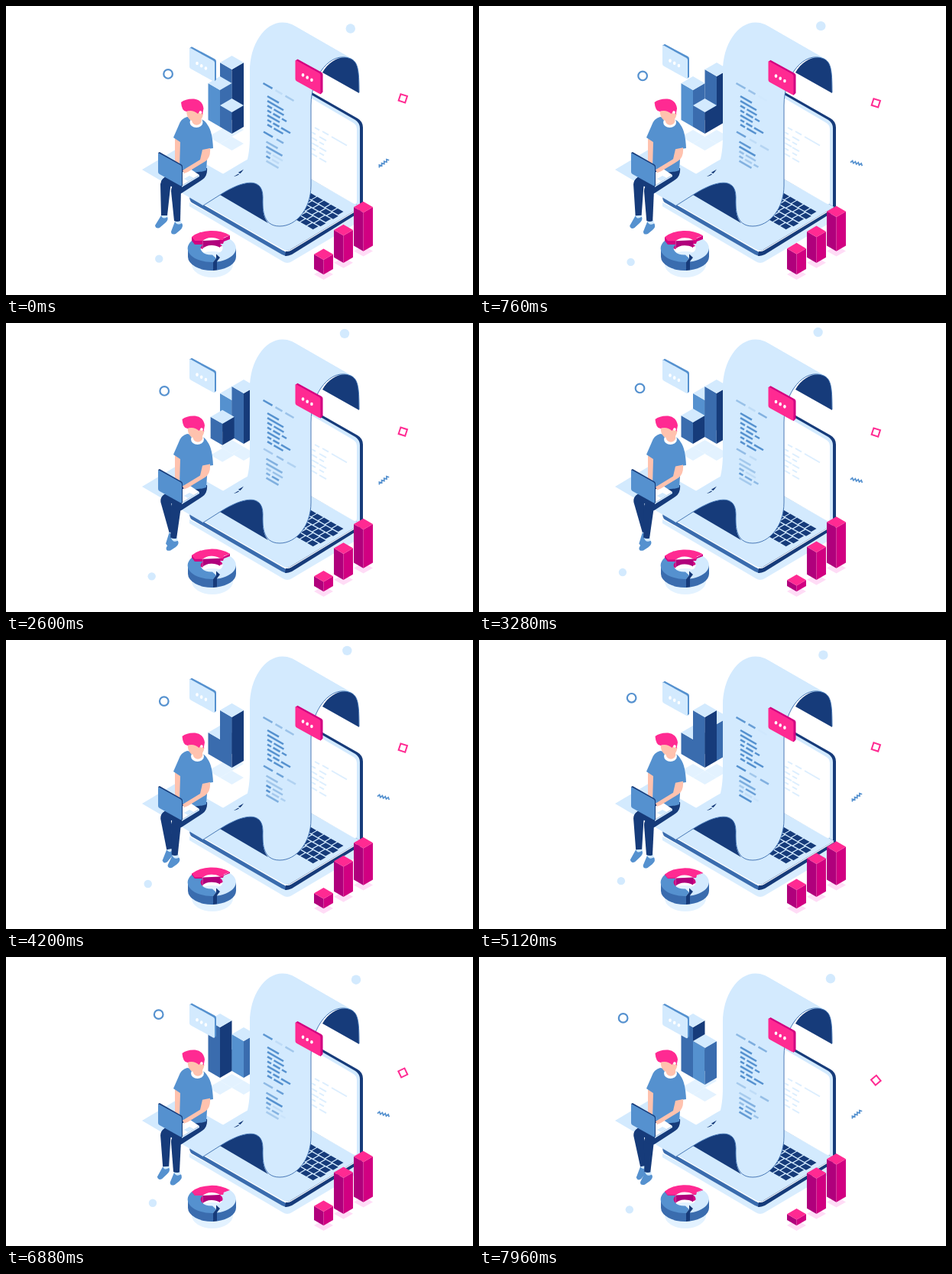
Recreate the animation shown at these times as an HTML page. Size 611x378 px, loop 8 s.

```html
<!DOCTYPE html>
<html lang="en">
<head>
<meta charset="utf-8">
<title>Isometric report</title>
<style>
  html, body { margin: 0; width: 100%; height: 100%; overflow: hidden; background: #fff; }
  svg { display: block; width: 611px; height: 378px; }
  .light { fill: #d3eafe; }
  .mid { fill: #5591cf; }
  .deep { fill: #3a6cae; }
  .navy { fill: #163b7a; }
  .pink { fill: #ff2a92; }
  .rose { fill: #d10081; }
  .plum { fill: #b0007c; }
  .skin { fill: #ffc2ae; }
  .white { fill: #fff; }
  .haze { fill: #e3f2ff; }
  .blush { fill: #ffdcf6; }
  .line { fill: none; stroke: #3a6cae; stroke-width: .9; }
  .shine { fill: none; stroke: #fff; stroke-width: 1.2; }
  #text, #faint { fill: none; stroke: #5591cf; stroke-width: 2.5; }
  #faint { stroke: #dceefe; stroke-width: 2; }
</style>
</head>
<body>
<svg viewBox="0 0 611 378">
  <g id="blocks"></g>

  <!-- laptop -->
  <path class="light" opacity=".85" d="M240 262V257L368 325L467 267V279L374 334Q368 338 362 334Z"/>
  <path class="deep" d="M240 249L362 319Q368 322 368 327Q365 327 361 325L243 257Q240 255 240 249Z"/>
  <path class="navy" d="M467 260V265Q467 267 464 269L374 325Q370 327 365 327L366 320Z"/>
  <path class="light" d="M240 246L310 204L339 188L466 262L373 318Q368 322 362 318L241 250Z"/>
  <path class="shine" d="M242 250L362 319Q368 322 373 319L464 264"/>
  <path class="navy" d="M395 110L460 147Q467 151 467 159V264L463 262L395 224Z"/>
  <path class="light" d="M395 113.500L457 149Q463 153 463 160V262L395 224Z"/>
  <path class="white" d="M395 118L453 152Q459 155 459 161V255Q459 261 454 258L395 224Z"/>
  <path id="faint"/>
  <path id="keys" class="navy"/>

  <!-- paper -->
  <path class="navy" d="M280 247C308 229 336 222 336 250C336 262 335 275 343 284Z"/>
  <path class="light" d="M178 214L225 186L283 219C310 234 319 205 319 170V85C319 45 345 12 374 24L449 67C426 61 399 90 399 130V235C399 265 380 288 358 288C334 288 336 262 336 250C336 222 308 229 280 247L258 261Z"/>
  <path class="light" d="M374 24L447 66Q462 72 462 95L440 75Z"/>
  <path class="navy" d="M414 87C424 70 440 64 451 69C460 73 462 82 462 114Z"/>
  <path class="line" d="M258 261L280 247C308 229 336 222 336 250C336 262 334 288 358 288C380 288 399 265 399 235V130C399 90 426 58 451 69C460 73 462 82 462 113"/>
  <g id="text"></g>

  <!-- donut -->
  <ellipse class="haze" cx="270" cy="338" rx="27" ry="17"/>
  <g id="slice">
    <path class="rose" d="M243 307V318L257.500 323V312ZM293 305V314L280 320V311Z"/>
    <path class="plum" d="M257.500 312V322A14 8.500 0 0 1 280 321V311Z"/>
    <path class="pink" d="M243 307A31.500 18 0 0 1 293 305L285 308L284 311L280 311A14 8.500 0 0 0 257.500 312L247 312Z"/>
  </g>
  <path class="deep" d="M238 317V328A31.500 18 0 0 0 271 346V335Z"/>
  <path class="deep" d="M301 317V328A31.500 18 0 0 1 276 345.500V334Z"/>
  <path class="mid" d="M243 307A31.500 18 0 0 0 271 335L275 330L270 325.500A14 8.500 0 0 1 257.500 312L247 312Z"/>
  <path class="light" d="M293 305A31.500 18 0 0 1 276 334.500L280 329L275 324.500A14 8.500 0 0 0 280 311L284 311L285 308Z"/>
  <path class="navy" d="M271 335L275 330V324.500L280 329L276 334V345.500L271 346Z"/>
  <g id="bars"></g>

  <!-- person -->
  <g id="legA">
    <path class="light" d="M203 271H211L212 279L203 280Z"/>
    <path class="mid" d="M203 274Q205 280 211 276Q213 280 208 284L201 290Q196 292 195 287Z"/>
    <path class="navy" d="M202 233Q203 225 211 224Q218 226 215 238L211 274H203Z"/>
  </g>
  <g id="legB">
    <path class="light" d="M221 280H229L230 288L221 288Z"/>
    <path class="mid" d="M221 282Q224 288 230 284Q233 288 228 293L222 298Q216 300 216 295Z"/>
    <path class="navy" d="M216 242Q216 235 222 234L229 240L228 281Q224 283 220 281Z"/>
  </g>
  <path class="navy" d="M263 212Q264 222 257 227L231 244Q226 248 218 242L217 236L203 233Q202 226 211 222L232 211Z"/>
  <path class="skin" d="M221 173L230 176L227 206L221 203Z"/>
  <path class="mid" d="M237 145Q229 147 226 156L219 172L228 178L227 212Q244 221 262 215L264 187L271 186Q270 164 264 156Q260 149 255 148Z"/>
  <g id="head">
    <ellipse class="white" cx="249" cy="152" rx="8.500" ry="7"/>
    <ellipse class="skin" cx="249.500" cy="150" rx="6.300" ry="5.800"/>
    <path class="skin" d="M236 138L252 134L258 141Q257 149 250 152L243 150Q237 148 236 138Z"/>
    <path class="pink" d="M229 126Q235 121 246 121.500Q257 123 258.500 134L257 142L254 137L251 141Q244 135 236 138Q230 138 229 126Z"/>
    <circle class="white" cx="254.500" cy="139" r="1.800"/>
  </g>
  <path class="white" d="M230 235L253 221L241 213L227 219Z"/>
  <path class="light" d="M230 235L253 221V223L230 237ZM233 226L240 222L246 225L238 229Z"/>
  <path id="arm" class="skin" d="M257 188L267 186Q268 198 261 203L238 217L233 219L231 215L254 201Z"/>
  <path class="navy" d="M199 192L201 191L229 207Q231 208 231 210V235L229 236Z"/>
  <path class="mid" d="M199 194Q199 192 201 193L228 208Q230 209 230 211V234Q230 236 228 235L201 220Q199 219 199 217Z"/>

  <!-- floating parts -->
  <g id="paleBubble">
    <path class="mid" d="M0 1L3 -1L33 15Q35 16 35 18V42L33 44Z"/>
    <path class="light" d="M0 2Q0 0 2 1L31 17Q33 18 33 20V43Q33 45 31 44L2 28Q0 27 0 25Z"/>
    <g class="white dots"></g>
  </g>
  <g id="pinkBubble">
    <path class="rose" d="M0 2L3 0L34 17Q36 18 36 20V43L33 46Z"/>
    <path class="pink" d="M0 3Q0 1 2 2L31 18Q33 19 33 21V44Q33 46 31 45L2 29Q0 28 0 26Z"/>
    <g class="white dots"></g>
  </g>
  <circle id="ring" r="5.800" fill="none" stroke="#5591cf" stroke-width="2.200"/>
  <circle id="dotTop" class="light" r="6.200"/>
  <circle id="dotLow" class="light" r="5.200"/>
  <rect id="square" x="-4.500" y="-4.500" width="9" height="9" fill="none" stroke="#ff2a92" stroke-width="2"/>
  <path id="zigzag" fill="none" stroke="#5591cf" stroke-width="1.700"/>
</svg>

<script>
const LOOP = 8;
const TAU = 2 * Math.PI;
const el = id => document.getElementById(id);
const clamp = v => Math.min(1, Math.max(0, v));
const ease = s => s < .5 ? 2 * s * s : 1 - 2 * (1 - s) * (1 - s);
const range = n => [...Array(n).keys()];

// Oscillation that reaches mid + reach at second `peak`.
const wave = (mid, reach, period, peak) => t => mid + reach * Math.cos(TAU * (t - peak) / period);
const still = v => () => v;

const poly = (cls, points) => `<polygon class="${cls}" points="${points.join(' ')}"/>`;
const diamond = (x, y, w, h, cls) => poly(cls, [x - w, y, x, y - h, x + w, y, x, y + h]);

// Upright isometric box; (x, y) is the centre of its base.
function box(x, y, tall, w, h, [top, left, right]) {
  const roof = y - tall;
  return poly(left, [x - w, roof, x, roof + h, x, y + h, x - w, y])
    + poly(right, [x + w, roof, x, roof + h, x, y + h, x + w, y])
    + diamond(x, roof, w, h, top);
}

// Three blocks take turns sliding into the one free cell of four, once a second.
const BLOCKS = [
  { tall: 66, skin: ['light', 'deep', 'navy'] },
  { tall: 48, skin: ['light', 'mid', 'deep'] },
  { tall: 28, skin: ['light', 'deep', 'navy'] }
];
const cell = n => ({
  x: 295.5 - 15.5 * Math.round(Math.sin(n * TAU / 4)),
  y: 149 - 9 * Math.round(Math.cos(n * TAU / 4))
});

function drawBlocks(t) {
  const placed = BLOCKS.map((block, i) => {
    const turn = (t - .24 - i) / 3, done = Math.floor(turn);
    const at = i - done - ease(clamp((turn - done) * 3 / .53));
    const a = cell(Math.floor(at)), b = cell(Math.floor(at) + 1), f = at - Math.floor(at);
    return { ...block, x: a.x + (b.x - a.x) * f, y: a.y + (b.y - a.y) * f };
  }).sort((a, b) => a.y - b.y);
  el('blocks').innerHTML =
    placed.map(b => diamond(b.x, b.y + 22, 15.5, 9, 'haze')).join('')
    + placed.map(b => box(b.x, b.y, b.tall, 15.5, 9, b.skin)).join('');
}

const BARS = [wave(48, 5, 3.9, 3.25), wave(40, -7, 11, 1.6), wave(17.5, -10, 4.7, 3.4)];
function drawBars(t) {
  el('bars').innerHTML = BARS.map((tall, i) => {
    const x = 467.5 - 26 * i, y = 313.5 + 15.2 * i;
    return diamond(x, y + 7, 12.5, 7, 'blush') + box(x, y, tall(t), 12.5, 7.3, ['pink', 'plum', 'rose']);
  }).join('');
}

// Code on the sheet: headings and the last block flicker, the first block stays.
const HEADING = [12, 9, 11];
const ROWS = [[15], [21], [6, 13], [5, 9, 6], [16], [5, 8, 12], [6, 12]];
const dash = (x, y, w) => `M${x} ${y}l${w} ${w * .575}`;
const flickers = [];

function writeRow(x, y, words, gap, flicker) {
  let dx = 0;
  words.forEach((w, i) => {
    const path = document.createElementNS('http://www.w3.org/2000/svg', 'path');
    path.setAttribute('d', dash(x + dx, y + dx * .575, w));
    el('text').append(path);
    if (flicker) flickers.push({ path, show: wave(.7 - i * .2, .35, 2.4 + flickers.length % 4, flickers.length * 1.7) });
    dx += w + gap;
  });
}
writeRow(336.5, 101, HEADING, 4, true);
ROWS.forEach((words, i) => writeRow(342, 118 + 6.2 * i, words, 2.5, false));
writeRow(337, 164.5, HEADING, 5, true);
ROWS.slice(0, 5).forEach((words, i) => writeRow(340.5, 177.5 + 6.3 * i, words, 2.5, true));

// Pale lines on the screen.
el('faint').setAttribute('d', dash(404, 159, 6) + dash(414, 164, 8) + dash(426, 171, 20)
  + range(5).map(i => dash(400, 165 + i * 7, 5 + i % 3 * 2) + dash(410, 171 + i * 7, 9 - i % 2 * 3)).join(''));

// Keyboard on the base plane: u runs along the width, v along the depth.
const onBase = (u, v) => `${(241 + 127 * u + 98 * v).toFixed(1)} ${(250 + 72 * u - 57 * v).toFixed(1)}`;
const key = (u, v, w, d) => `M${onBase(u, v)}L${onBase(u + w, v)}L${onBase(u + w, v + d)}L${onBase(u, v + d)}Z`;
el('keys').setAttribute('d', range(5).flatMap(row =>
  range(13).map(col => key(.03 + col * .07 + row % 2 * .012, .435 + row * .084, .06, .07))).join(''));

document.querySelectorAll('.dots').forEach(g => {
  g.innerHTML = range(3).map(i => `<ellipse cx="${10 + i * 5.7}" cy="${20.8 + i * 3.2}" rx="1.800" ry="2.300"/>`).join('');
});
el('zigzag').setAttribute('d', 'M' + range(9).map(i => `${i * 2 - 8} ${i % 2 ? -1.4 : 1.4}`).join('L'));

const drift = wave(0, 3.5, 3, .6);
const FLOATS = {
  ring: [t => 211 - .3 * t * t + drift(t), wave(83, 9, 9.6, 1.3)],
  dotTop: [wave(451.5, -8.5, 11, 2.6), wave(21, -9, 7.6, 3.4)],
  dotLow: [wave(193, 7.5, 10, -.4), wave(325.5, 10.5, 8, 1.35)],
  square: [still(519.3), t => 126.5 + 3.7 * t + wave(0, 6, 5.8, 2.6)(t), t => 18 - 58 * ease(clamp((t - 5.2) / 2.6))],
  zigzag: [still(494), still(205.5), t => -10.5 - 27 * Math.tanh(4 * wave(0, 1, 2.8, -.4)(t))],
  paleBubble: [still(240), wave(54.5, -7.7, 10.2, 2.5)],
  pinkBubble: [still(378.5), wave(78.5, -9, 11, -.2)],
  slice: [still(0), wave(-2.5, -2.5, 13, 0)],
  head: [t => 1.5 * clamp(t / 2), still(0)],
  arm: [still(0), wave(-1, 1, 4, 0)]
};
const place = (id, transform) => el(id).setAttribute('transform', transform);

function draw(now) {
  const t = now / 1000 % LOOP;
  drawBlocks(t);
  drawBars(t);
  for (const [id, [x, y, turn = still(0)]] of Object.entries(FLOATS))
    place(id, `translate(${x(t)} ${y(t)}) rotate(${turn(t)})`);
  for (const { path, show } of flickers) path.setAttribute('opacity', clamp(show(t)));
  const swing = wave(.5, -.5, 6, 0)(t);
  place('legA', `rotate(${-15 * swing} 208 232)`);
  place('legB', `rotate(${7 * swing} 222 240)`);
  requestAnimationFrame(draw);
}
requestAnimationFrame(draw);
</script>
</body>
</html>
```
